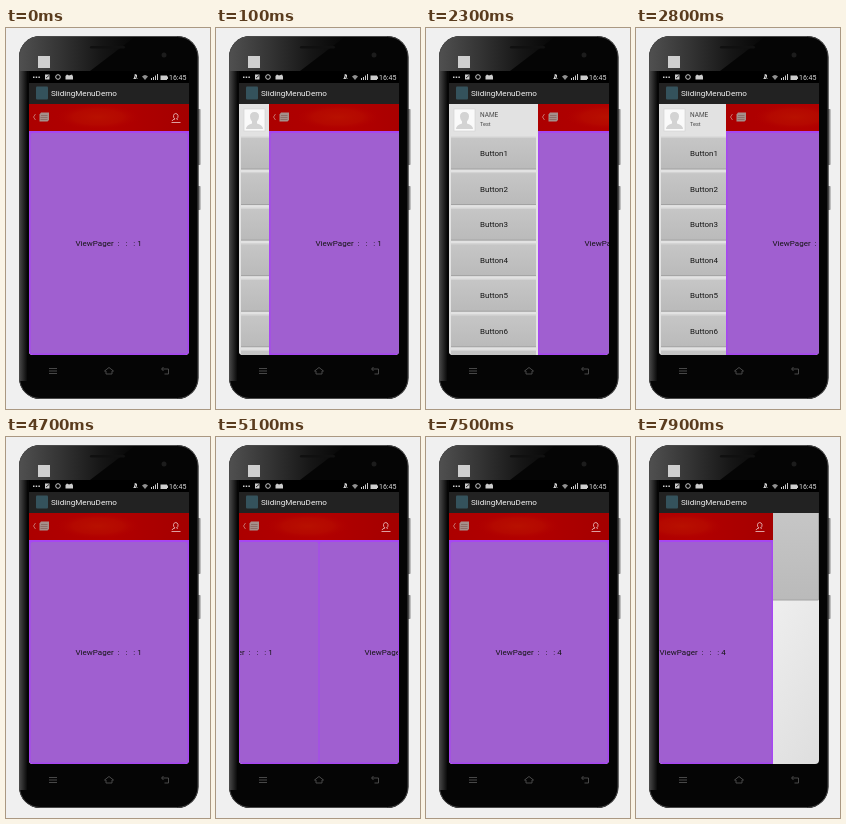
Write an HTML page that moves like this. It is 204 px wide and 381 px high and loops after 8000 ms.

```html
<!DOCTYPE html>
<html lang="en">
<head>
<meta charset="utf-8">
<title>Sliding menu</title>
<style>
html, body { margin: 0; width: 100%; height: 100%; overflow: hidden; background: #f0f0f0; }
svg { display: block; width: 100%; height: 100%; }
text { font: 8px Roboto, sans-serif; fill: #151515; white-space: pre; }
</style>
</head>
<body>
<svg viewBox="0 0 204 381">
  <defs>
    <linearGradient id="gloss">
      <stop offset="0" stop-color="#505050"/><stop offset=".35" stop-color="#343434"/>
      <stop offset=".7" stop-color="#161616"/><stop offset="1" stop-color="#050505"/>
    </linearGradient>
    <linearGradient id="side">
      <stop offset="0" stop-color="#4c4c4c"/><stop offset="1" stop-color="#0a0a0a"/>
    </linearGradient>
    <linearGradient id="red">
      <stop offset="0" stop-color="#ac0000"/><stop offset=".5" stop-color="#b20000"/>
      <stop offset="1" stop-color="#a40000"/>
    </linearGradient>
    <radialGradient id="glow">
      <stop offset="0" stop-color="#b81000"/><stop offset=".6" stop-color="#b60c00" stop-opacity=".7"/>
      <stop offset="1" stop-color="#b00000" stop-opacity="0"/>
    </radialGradient>
    <linearGradient id="key" x2="0" y2="1">
      <stop offset="0" stop-color="#c6c6c6"/><stop offset="1" stop-color="#bababa"/>
    </linearGradient>
    <linearGradient id="pale" x2="1" y2="1">
      <stop offset="0" stop-color="#e2e2e2"/><stop offset=".5" stop-color="#efefef"/>
      <stop offset="1" stop-color="#dedede"/>
    </linearGradient>
    <clipPath id="phone"><rect x="13" y="8" width="179.500" height="363" rx="21"/></clipPath>
    <clipPath id="screen"><path d="M23 76H183V323q0 4-4 4H27q-4 0-4-4z"/></clipPath>
    <clipPath id="pager"><rect x="24" y="104.500" width="158" height="221.500"/></clipPath>
  </defs>

  <!-- phone -->
  <path d="M192 81h2q.5 0 .5 1v54q0 1-.5 1h-2zM192 158h2q.5 0 .5 1v22q0 1-.5 1h-2z" fill="#8a8a8a"/>
  <g clip-path="url(#phone)">
    <path d="M13 8h180v363H13z" fill="#050505"/>
    <path d="M13 8h117L84 43H13z" fill="url(#gloss)"/>
    <path d="M13 43h8v310h-8z" fill="url(#side)"/>
    <rect x="13.500" y="8.500" width="178.500" height="362" rx="20.500" fill="none" stroke="#4a4a4a"/>
  </g>
  <rect x="84" y="18" width="35" height="2.500" rx="1.200" fill="#101010"/>
  <circle cx="158" cy="27" r="2.500" fill="#1c1c1c"/>
  <rect x="32" y="28" width="12" height="12" fill="#cfcfcf"/>
  <g fill="none" stroke="#484848">
    <path d="M43 340.500h8m-8 2.500h8m-8 2.500h8"/>
    <path d="M98.500 343l4.500-3.500 4.500 3.500h-1.500v3h-6v-3z"/>
    <path d="M157.500 339l-2 2 2 2M156 341h6.500v5h-4"/>
  </g>

  <!-- status and title bars -->
  <path d="M23 43h160v12H23z"/>
  <g fill="#ccc">
    <path d="M27 48.500h1.500v1.500H27zm2.700 0h1.500v1.500h-1.500zm2.700 0h1.500v1.500h-1.500z"/>
    <path d="M39 46.500h4.500v5H39zM59.500 48l1.500-1.500 2 1 3-1 1 2v3h-7.500z"/>
    <path d="M127 51l1-1v-3l1.500-1 1.500 1v3l1 1z"/>
    <path d="M136 48.500q3-3 6 0l-3 3.500z" opacity=".7"/>
    <path d="M145 50h1v2h-1zm2-1h1v3h-1zm2-1.500h1v4.500h-1zm2-1.500h1v6h-1zM154.500 47.500h6.500v1h1v2.500h-1v1h-6.500z"/>
  </g>
  <path d="M127 46l5 6M40 50l3-2.500" stroke="#000" stroke-width=".8"/>
  <circle cx="52" cy="49" r="2.300" fill="none" stroke="#ccc"/>
  <text x="163" y="52" style="font-size:7px;fill:#dcdcdc">16:45</text>
  <path d="M23 55h160v21H23z" fill="#222"/>
  <rect x="30" y="58.500" width="12" height="13" rx="1" fill="#34525c"/>
  <text x="45" y="68" style="font-size:8.100px;fill:#f4f4f4">SlidingMenuDemo</text>

  <g clip-path="url(#screen)">
    <path d="M23 76h160v251H23z" fill="url(#pale)"/>
    <!-- left menu -->
    <path d="M23 76h90v251H23z" fill="#e2e2e2"/>
    <rect x="28" y="81" width="21" height="22" fill="#fafafa" stroke="#cfcfcf" stroke-width=".6"/>
    <path d="M30 101q0-4 6-5.500v-2q-2-2-2-5 0-4.500 4.500-4.500t4.500 4.500q0 3-2 5v2q6 1.500 6 5.500z" fill="#d3d3d3"/>
    <text x="54" y="89" style="font-size:6.500px;fill:#444">NAME</text>
    <text x="54" y="98" style="font-size:5.500px;fill:#444">Test</text>
    <g id="menu"></g>
    <!-- right menu -->
    <rect x="114" y="76" width="68" height="87" fill="url(#key)"/>
    <path d="M114 163h68.500V76" fill="none" stroke="#a2a2a2"/>
    <!-- sliding content -->
    <g id="content">
      <path d="M23 76h160v27H23z" fill="url(#red)"/>
      <ellipse cx="92" cy="89" rx="42" ry="13" fill="url(#glow)"/>
      <path d="M29.500 86l-2 3 2 3" fill="none" stroke="#d08a84" stroke-width=".8"/>
      <path d="M35 84.500h8v7.500l-1.500 1.500H33.500v-7z" fill="#a5908b"/>
      <path d="M35 87.500h6.500m-7 2h7m-7 2h7" stroke="#86615b" stroke-width=".7"/>
      <path d="M165.500 94.500h9M166 93q.5-1.500 3-2-2-1.500-1.500-3.500.5-2 2.200-2t2.300 2q.5 2-1.500 3.500 1 .2 1.500.7" fill="none" stroke="#eccaca" stroke-width=".8"/>
      <path d="M23 103h160v224H23z" fill="#a746f2"/>
      <g clip-path="url(#pager)"><g id="pages"></g></g>
    </g>
  </g>
</svg>
<script>
const $ = id => document.getElementById(id);
const LOOP = 8000, PAGE_W = 158;

// start time, content offset, page, swipe towards the next page
const states = [
  [0, 0, 1, 0], [100, 30, 1, 0], [2000, 54, 1, 0], [2300, 89, 1, 0],
  [2800, 67, 1, 0], [4700, 0, 1, 0], [5100, 0, 1, .5], [6500, 0, 2, 0],
  [7000, 0, 3, 0], [7500, 0, 4, 0], [7900, -46, 4, 0]
];

let keys = '';
for (let i = 0; i < 7; i++) {
  const y = 109.5 + i * 35.55;
  keys += `<rect x="25" y="${y}" width="85" height="31.5" fill="url(#key)"/>
    <path d="M25 ${y + 31.5}h85" stroke="#a0a0a0"/>
    <path d="M25 ${y - .5}h85" stroke="#d2d2d2"/>
    <text x="54" y="${y + 18.5}">Button${i + 1}</text>`;
}
$('menu').innerHTML = keys;

let pages = '';
for (let i = 0; i < 4; i++) {
  const x = 24 + i * PAGE_W;
  pages += `<rect x="${x + .5}" y="105" width="${PAGE_W - 1}" height="220.500" rx="2" fill="#a05fd0"/>
    <text x="${x + 45.5}" y="218.3">ViewPager  :   :   : ${i + 1}</text>`;
}
$('pages').innerHTML = pages;

function draw(now) {
  const t = now % LOOP;
  const [, offset, page, swipe] = states.findLast(s => s[0] <= t);
  $('content').setAttribute('transform', `translate(${offset})`);
  $('pages').setAttribute('transform', `translate(${-(page - 1 + swipe) * PAGE_W})`);
  requestAnimationFrame(draw);
}
draw(0);
</script>
</body>
</html>
```
